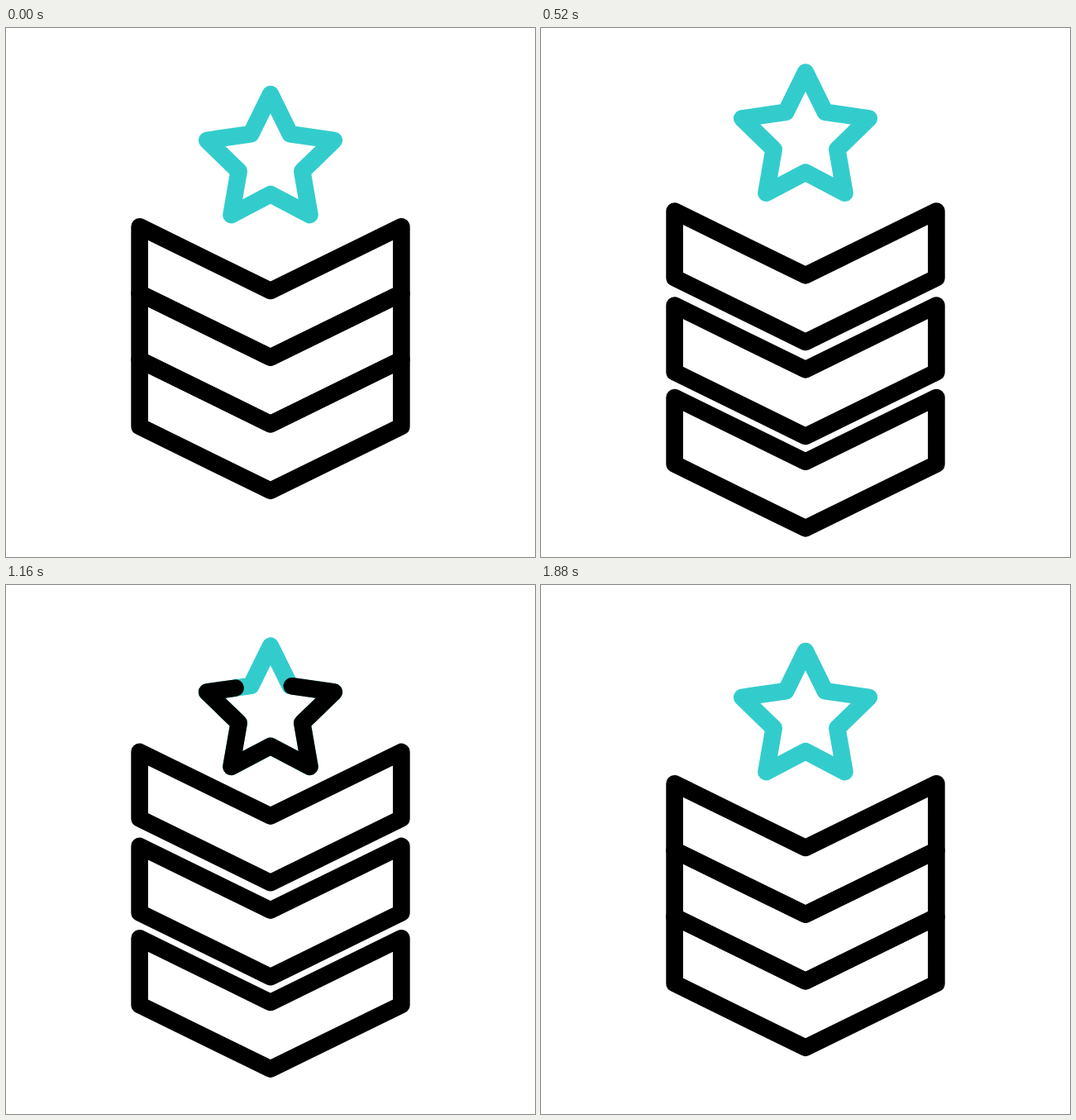
Recreate the animation shown at these times as an HTML page. Size 640 by 640 pixels, loop 2000 ms.

```html
<!DOCTYPE html>
<html lang="en">
<head>
<meta charset="utf-8">
<title>Rank badge</title>
<style>
  html, body { margin: 0; width: 100%; height: 100%; overflow: hidden; background: #fff; }
  svg { display: block; width: 100%; height: 100%; }
  path { fill: none; stroke: #000; stroke-width: 20.6; stroke-linecap: round; stroke-linejoin: round; }
</style>
</head>
<body>
<svg id="stage" viewBox="0 0 640 640"></svg>
<script>
const TICK = 40, TICKS = 50;
const stage = document.getElementById('stage');

function addPath(points, color) {
  const path = document.createElementNS('http://www.w3.org/2000/svg', 'path');
  path.setAttribute('d', 'M' + points.map(p => p.join(' ')).join('L') + 'Z');
  if (color) path.style.stroke = color;
  return stage.appendChild(path);
}

const moveY = (el, y) => el.setAttribute('transform', `translate(0 ${y.toFixed(3)})`);

// Interpolates [tick, value] keys with a symmetric ease.
function track(keys, t) {
  if (t <= keys[0][0]) return keys[0][1];
  for (let i = 1; i < keys.length; i++) {
    const [t0, v0] = keys[i - 1], [t1, v1] = keys[i];
    if (t < t1) {
      const u = (t - t0) / (t1 - t0);
      return v0 + (v1 - v0) * u * u * (3 - 2 * u);
    }
  }
  return keys[keys.length - 1][1];
}

const left = 161.6, right = 478.4, side = 240.3, dip = 318, height = 80.6, lift = 39.4;
const chevrons = [1, 34.4, 65.2].map((spread, i) => {
  const y = i * height;
  return {
    el: addPath([
      [left, side + y], [320, dip + y], [right, side + y],
      [right, side + y + height], [320, dip + y + height], [left, side + y + height]
    ]),
    keys: [[3, 0], [11, spread], [15, spread - lift], [41, spread - lift], [47, 0]]
  };
});

// Runs clockwise from the top point.
const starPoints = Array.from({ length: 10 }, (_, i) => {
  const r = i % 2 ? 40.3 : 80.8, a = i * Math.PI / 5;
  return [320 + r * Math.sin(a), 160.8 - r * Math.cos(a)];
});
const star = addPath(starPoints, '#33cccc');
const trace = addPath(starPoints);
trace.setAttribute('pathLength', 1);

const starKeys = [[3, 0], [11, -55.2], [15, 2.3], [20, -6.3], [41, -6.3], [47, 0]];
const traceHead = [[19, 0], [32, 1]];
const traceTail = [[26, 0], [41, 1]];

function draw(t) {
  for (const { el, keys } of chevrons) moveY(el, track(keys, t));

  const y = track(starKeys, t);
  moveY(star, y);
  moveY(trace, y);

  const tail = track(traceTail, t), length = track(traceHead, t) - tail;
  trace.style.display = length > 0 ? '' : 'none';
  trace.setAttribute('stroke-dasharray', `${Math.max(length, 0)} 2`);
  trace.setAttribute('stroke-dashoffset', -tail);
}

const start = performance.now();
function loop() {
  draw(Math.floor((performance.now() - start) / TICK) % TICKS);
  requestAnimationFrame(loop);
}
draw(0);
requestAnimationFrame(loop);
</script>
</body>
</html>
```
